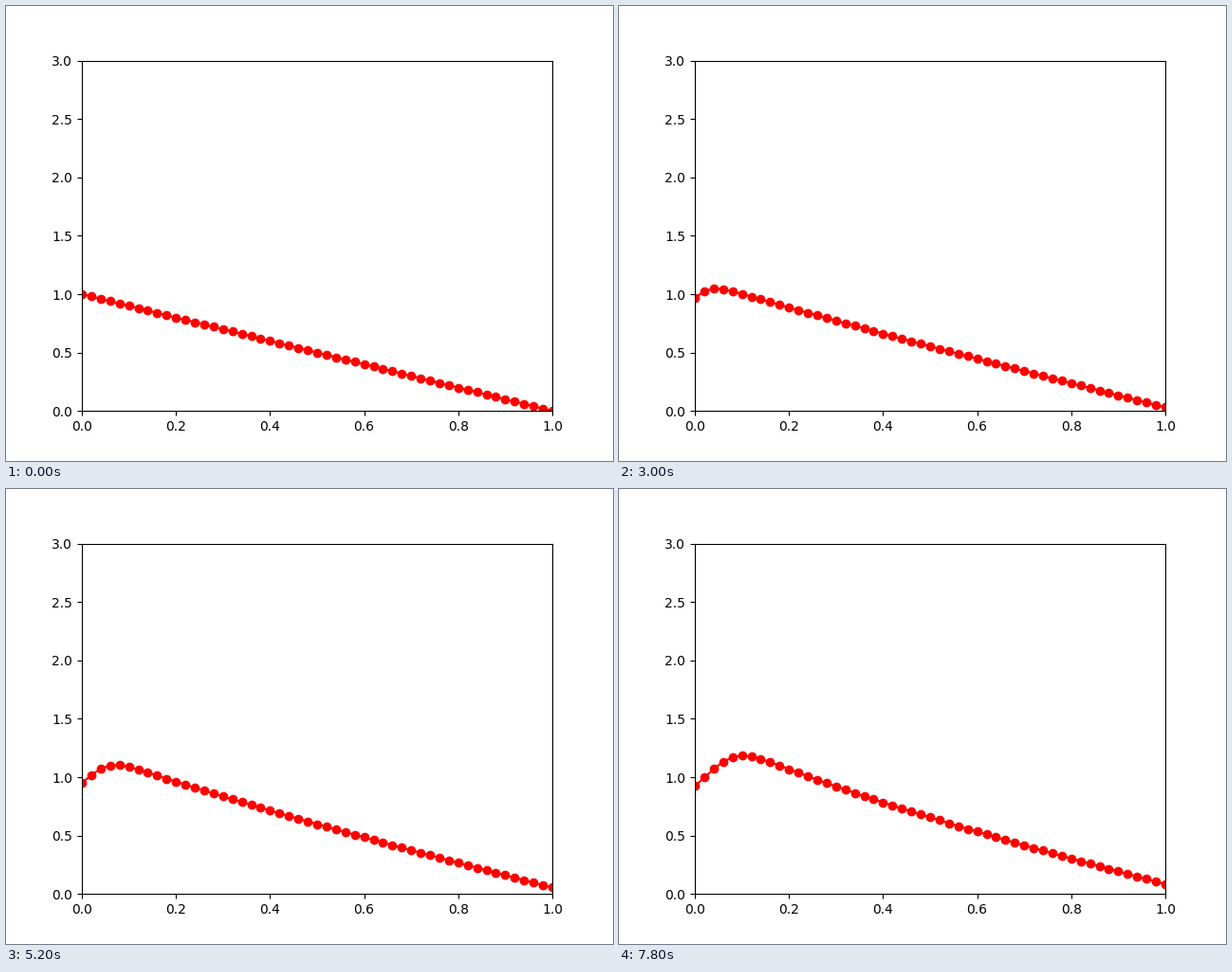
Recreate the animation shown at these times as a matplotlib script. Size 640 by 480 pixels, loop 8 s.

```python
import numpy as np
import matplotlib.pyplot as plt
from matplotlib.animation import FuncAnimation

FRAMES, INTERVAL = 40, 200
DT = 0.002
x = np.linspace(0, 1, 51)
DX = x[1] - x[0]


def growth(u):
    return u + 1.65 * u**3


def solve():
    """Upwind steps of u_t + u_x = growth(u) with a decaying inflow."""
    u = 1 - x
    states = [u]
    for n in range(1, FRAMES):
        new = np.empty_like(u)
        new[1:] = u[1:] - DT / DX * np.diff(u) + DT * growth(u[1:])
        new[0] = np.exp(-n * DT)
        states.append(new)
        u = new
    return states


states = solve()

fig, ax = plt.subplots(figsize=(6.4, 4.8), dpi=100)
ax.set_xlim(0, 1)
ax.set_ylim(0, 3)
line, = ax.plot(x, states[0], "ro-")


def update(n):
    line.set_ydata(states[n])
    return line,


anim = FuncAnimation(fig, update, frames=FRAMES, interval=INTERVAL,
                     repeat=True, repeat_delay=0)
plt.show()
```
